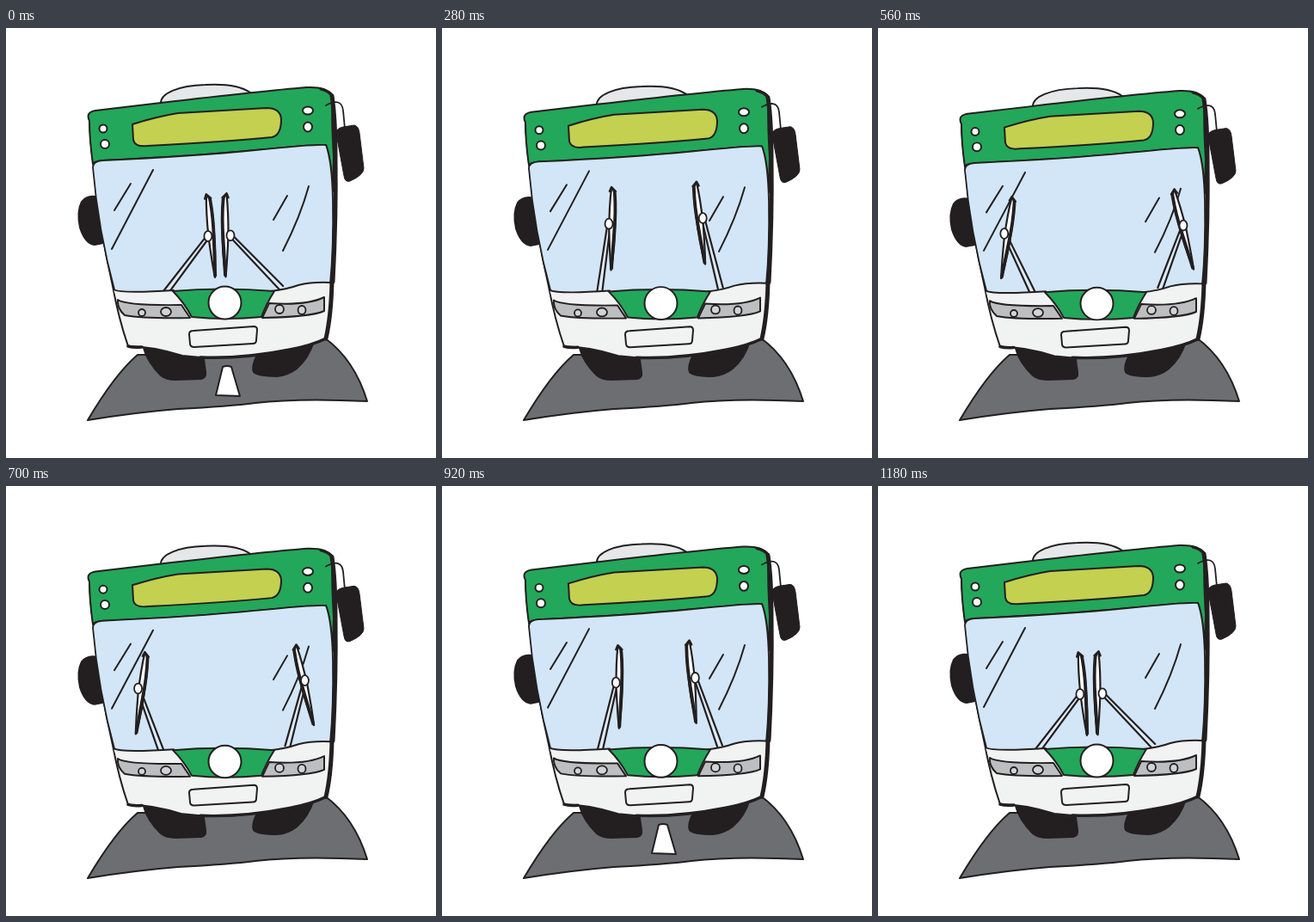
Recreate the animation shown at these times as an HTML page with a canvas. Size 500x500 px, loop 1.2 s.

```html
<!DOCTYPE html>
<html lang="en">
<head>
<meta charset="utf-8">
<title>Bus with wipers</title>
<style>
html, body { margin: 0; width: 100%; height: 100%; overflow: hidden; background: #fff; }
canvas { display: block; width: 500px; height: 500px; }
</style>
</head>
<body>
<canvas id="stage"></canvas>
<script>
const LOOP = 1200, TURN = 580, END = 1180;
const INK = '#231f20', GREEN = '#23a75a', PANEL = '#f1f2f2', STRIP = '#bcbec0';

const canvas = document.getElementById('stage');
const ratio = window.devicePixelRatio || 1;
canvas.width = canvas.height = 500 * ratio;
const ctx = canvas.getContext('2d');
ctx.lineJoin = ctx.lineCap = 'round';

const lerp = (a, b, p) => a + (b - a) * p;

// Bezier ease-in-out (.42, 0, .58, 1)
function ease(x) {
  x = Math.min(1, Math.max(0, x));
  let lo = 0, hi = 1;
  for (let i = 0; i < 20; i++) {
    const s = (lo + hi) / 2, r = 1 - s;
    if (1.26 * s * r * r + 1.74 * s * s * r + s * s * s < x) lo = s; else hi = s;
  }
  return lo * lo * (3 - 2 * lo);
}

function shape(d, fill, width = 2) {
  const path = new Path2D(d);
  if (fill) {
    ctx.fillStyle = fill;
    ctx.fill(path);
  }
  if (width) {
    ctx.strokeStyle = INK;
    ctx.lineWidth = width;
    ctx.stroke(path);
  }
}

const line = (d, width = 2) => shape(d, null, width);

function oval(x, y, rx, ry, fill = '#fff', width = 2) {
  ctx.beginPath();
  ctx.ellipse(x, y, rx, ry, 0, 0, Math.PI * 2);
  ctx.fillStyle = fill;
  ctx.fill();
  ctx.strokeStyle = INK;
  ctx.lineWidth = width;
  ctx.stroke();
}

function drawRoad(t) {
  shape('M95 456 Q127 402 153 380 L230 380 L370 360 Q405 385 420 434 Q340 430 290 436 Q260 440 200 443 Q150 447 95 456 Z', '#6d6e71');
  const beat = t % 300;
  if (beat < 90) shape('M252 394 Q257 392 262 394 L272 428 L244 427 Z', '#fff');
  else if (beat >= 190 && beat < 250) shape('M253 372 L260 372 L270 407 L246 405 Z', '#fff');
}

function drawShell() {
  shape('M160 372 Q164 388 180 404 Q186 409 197 409 L227 408 Q233 407 232 400 L229 378 Z', INK);
  shape('M292 380 Q285 394 288 400 Q292 405 315 405 Q328 404 338 396 Q352 384 358 364 Z', INK);
  shape('M108 197 Q95 193 88 202 Q82 214 86 232 Q92 251 103 252 L113 250 Z', INK);
  shape('M180 88 C179 76 200 67 232 66 Q268 64 284 75 L284 80 Z', '#e6e7e8');
  shape('M97 108 Q98 130 101 155 Q108 230 124 300 Q131 338 142 370 Q170 370 205 381 Q260 388 330 374 Q356 369 372 361 Q379 335 380 290 Q385 210 383 150 Q383 105 380 80 Z', PANEL);
}

function drawFront() {
  shape('M101 158 Q97 130 97 108 Q92 98 104 96 L180 87 Q300 73 350 69 Q372 68 380 78 Q378 100 381 150 L380 190 Q378 150 372 136 Q360 135 290 142 Q220 149 112 154 Q102 155 101 158 Z', GREEN);
  shape('M101 162 Q101 155 112 154 Q220 149 290 142 Q360 135 372 136 Q379 155 380 200 Q381 255 377 297 L340 308 L127 308 Q107 235 101 162 Z', '#d2e6f7', 1.8);
  shape('M147 112 Q175 103 200 99 L303 93 Q319 93 320 106 Q320 125 309 127 Q260 132 165 137 Q150 139 148 130 Z', '#c4d04f');
  oval(113, 117, 4.5, 4.5);
  oval(115, 135, 5, 5);
  oval(351, 96, 6, 4.5);
  oval(351, 115, 5, 5.5);
  line('M145 181 L126 212 M171 165 L123 257 M327 195 L311 223 M352 184 Q342 220 322 259');
}

// side is 1 for the left wiper and -1 for the mirrored one
function drawWiper(w, p) {
  const angle = lerp(w.swing[0], w.swing[1], p) * Math.PI / 180;
  const hubX = w.pivot[0] + w.reach * Math.sin(angle);
  const hubY = w.pivot[1] - w.reach * Math.cos(angle);
  const footX = lerp(w.foot[0], w.foot[1], p), footY = w.pivot[1];
  const dx = Math.cos(angle), dy = Math.sin(angle);

  shape(`M${footX - 3 * dx} ${footY - 3 * dy} L${hubX - 1.5 * dx} ${hubY - 1.5 * dy}
    L${hubX + 2 * dx} ${hubY + 2 * dy} L${footX + 3 * dx} ${footY + 3 * dy}`, '#dfeaf4', 2.2);

  ctx.save();
  ctx.translate(hubX + lerp(w.offset[0], w.offset[1], p), hubY + 7 * Math.sin(2.3 * p));
  ctx.rotate(lerp(w.tilt[0], w.tilt[1], p) * Math.PI / 180);
  ctx.scale(w.side, 1);
  shape('M-2 -48 Q-4 -28 -3.5 0 Q-2 30 0 48 Q4 20 3.5 -10 Q4 -38 0 -46 Z', '#fff', 2.2);
  line('M2 -42 Q4 -20 2.5 4 L0.5 46', 3.8);
  line('M-4 -44 L-2 -49 L3 -44', 2.5);
  ctx.restore();
  oval(hubX, hubY, 4.5, 6, '#fff', 1.8);
}

const wipers = [
  { side: 1, pivot: [187, 307], reach: 80.7, swing: [36.4, -30], foot: [186, 180], offset: [4, 3.5], tilt: [-4.8, 8.6] },
  { side: -1, pivot: [318, 302], reach: 83.3, swing: [-43.2, 26.5], foot: [320, 328], offset: [-6, 0], tilt: [-0.6, -14.6] }
];

function drawBumper() {
  shape('M125 304 Q134 309 195 305 L308 306 Q326 304 340 299 Q356 295 377 296 Q376 306 372 314 L372 335 L136 337 Z', PANEL, 0);
  line('M125 304 Q134 309 195 305 M308 306 Q326 304 340 299 Q356 295 377 296');
  shape('M130 316 Q140 323 204 322 L214 337 Q160 338 138 334 Q129 326 130 316 Z', STRIP);
  shape('M306 320 Q350 323 370 313 L370 329 Q355 336 298 337 Z', STRIP);
  oval(158, 331, 4, 4, '#d1d3d4', 1.8);
  oval(186, 330, 6, 5, '#d1d3d4', 1.8);
  oval(318, 327, 5, 5, '#d1d3d4', 1.8);
  oval(344, 328, 4.5, 5, '#d1d3d4', 1.8);
  shape('M194 306 Q250 301 312 306 Q302 322 297 336 Q255 340 216 336 Q207 319 194 306 Z', GREEN);
  oval(254.5, 319.5, 19, 19);
  shape('M213 356 Q213 352 218 352 L288 347 Q292 347 292 351 L291 363 Q291 367 287 367 L219 371 Q214 371 214 367 Z', PANEL);
  line('M142 370 Q148 372 158 371', 3.5);
  line('M226 383 Q275 385 330 374 Q356 369 372 361', 3.5);
  line('M372 361 Q378 335 379 295', 5);
  line('M380 295 Q384 220 383 150 Q383 105 379 79', 5);
  line('M366 71 Q375 73 379 79', 3);
  line('M372 90 Q390 80 392 96 L394 117', 1.8);
  shape('M384 123 Q383 117 392 115 L405 113 Q410 114 411 122 L416 163 Q416 171 400 178 Q394 180 393 172 Z', INK, 1);
}

function drawScene(t) {
  const p = t < TURN ? ease(t / TURN) : ease((END - t) / (END - TURN));
  ctx.setTransform(ratio, 0, 0, ratio, 0, 0);
  ctx.fillStyle = '#fff';
  ctx.fillRect(0, 0, 500, 500);
  drawRoad(t);

  // The bus squashes towards its wheels
  ctx.translate(0, 411);
  ctx.scale(1, 1 - 0.012 * p);
  ctx.translate(0, -411);
  drawShell();
  drawFront();
  wipers.forEach(w => drawWiper(w, p));
  drawBumper();
}

function tick() {
  drawScene(performance.now() % LOOP);
  requestAnimationFrame(tick);
}
tick();
</script>
</body>
</html>
```
